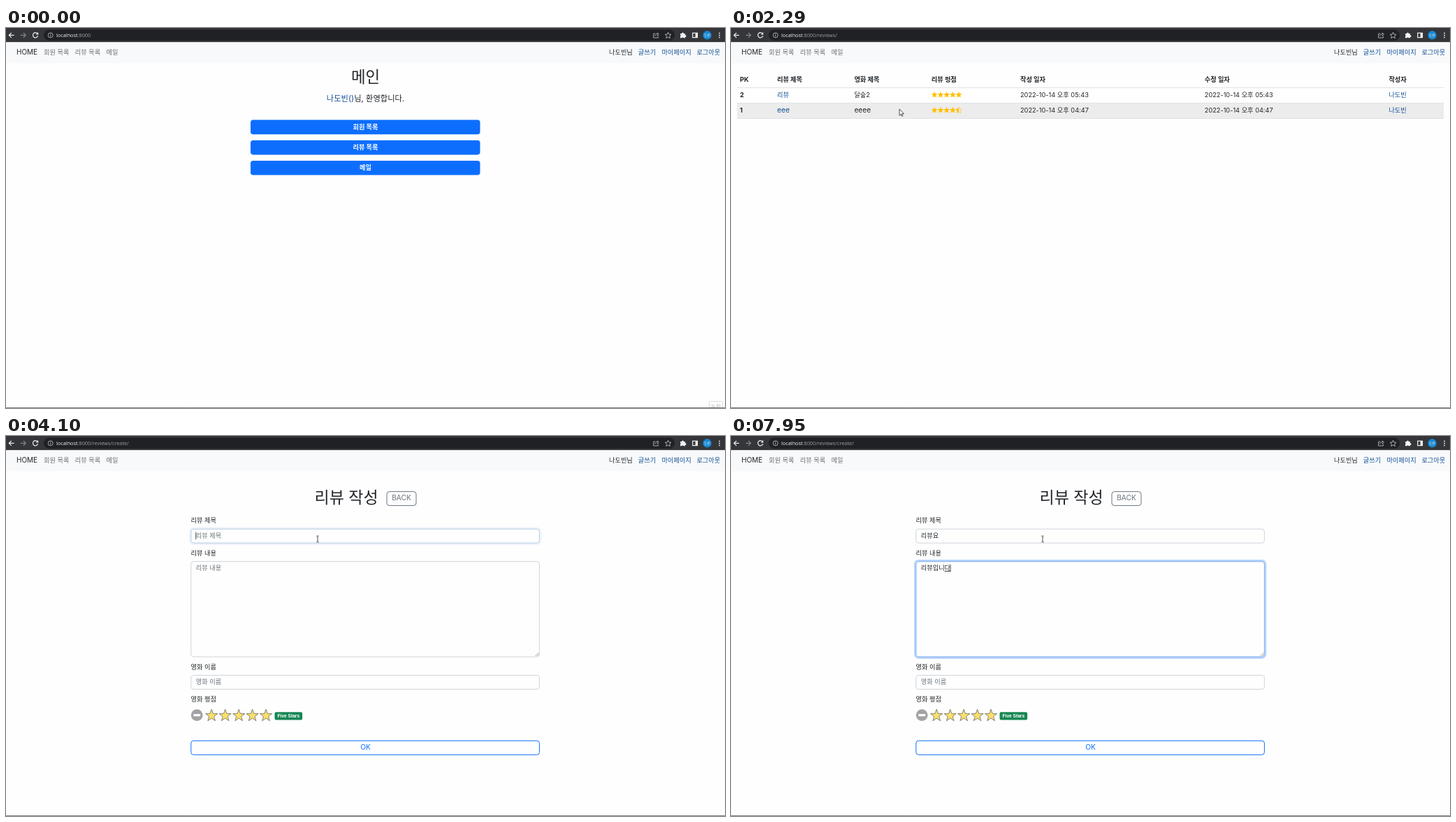
Write an HTML page that moves like this. It is 1029 px wide and 544 px high and loops after 8 s.

```html
<!DOCTYPE html>
<html lang="ko">
<head>
<meta charset="utf-8">
<title>리뷰 작성</title>
<style>
html, body { margin: 0; width: 100%; height: 100%; overflow: hidden; background: #fefefe; }
svg { display: block; width: 100vw; height: 100vh; }
text { font: 400 9.2px Inter, "Noto Sans CJK KR", sans-serif; fill: #212529; white-space: pre; }
.mid { text-anchor: middle; }
.bold, .head text { font-weight: 700; }
.link { fill: #124f97; }
.nav { fill: #6f7072; }
.muted { fill: #6c757d; }
.latin { font-size: 10.2px; }
.white { fill: #fff; }
.url { font: 7.3px "Open Sans", sans-serif; fill: #f1f3f4; }
.url tspan { fill: #9aa0a6; }
.field { fill: #fefefe; stroke: #ced4da; }
.rule { stroke: #dee2e6; }
.status { font: 6.3px "Open Sans", sans-serif; fill: #e8eaed; }
.status-box { fill: #3c4043; }
.ring { fill: none; stroke: #0d6efd; stroke-opacity: .28; stroke-width: 2.4; }
.edge { fill: none; stroke: #86b7fe; }
.composing { text-decoration: underline; }

.step { animation: 8s step-end infinite; }
.ease { animation: 8s linear infinite; }
#tip { animation-name: tip; }
#home { animation-name: home; }
#list { animation-name: list; }
#form { animation-name: form; }
#reload { animation-name: reload; }
#stop { animation-name: stop; }
#membersHover { animation-name: members-hover; }
#reviewsHover { animation-name: reviews-hover; }
#row1 { animation-name: row1; }
#row2 { animation-name: row2; }
#navMembers { animation-name: nav-members; }
#navWrite { animation-name: nav-write; }
#toMembers { animation-name: to-members; }
#toReviews { animation-name: to-reviews; }
#toCreate { animation-name: to-create; }
#titleFocus { animation-name: title-focus; }
#bodyFocus { animation-name: body-focus; }
#pointer { animation-name: travel; }
#arrow { animation-name: arrow; }
#hand { animation-name: hand; }
#beam { animation-name: beam; }

@keyframes tip { 0% { opacity: 1 } .375%, 100% { opacity: 0 } }
@keyframes home { 0% { opacity: 1 } 23.1%, 100% { opacity: 0 } }
@keyframes list { 0%, 46%, 100% { opacity: 0 } 23.1% { opacity: 1 } }
@keyframes form { 0% { opacity: 0 } 46%, 100% { opacity: 1 } }
@keyframes reload { 0%, 23.1%, 46%, 100% { opacity: 1 } 22%, 42.75% { opacity: 0 } }
@keyframes stop { 0%, 23.1%, 46%, 100% { opacity: 0 } 22%, 42.75% { opacity: 1 } }
@keyframes members-hover { 0%, 16.96%, 100% { opacity: 0 } 15.4% { opacity: 1 } }
@keyframes reviews-hover { 0%, 100% { opacity: 0 } 17.6% { opacity: 1 } }
@keyframes row2 { 0%, 32.8%, 100% { opacity: 0 } 27.85% { opacity: 1 } }
@keyframes row1 { 0%, 35.7%, 100% { opacity: 0 } 32.8% { opacity: 1 } }
@keyframes nav-members { 0%, 10.9%, 100% { fill: #6f7072 } 8.5% { fill: #4a4b4d } }
@keyframes nav-write { 0%, 43.9%, 100% { fill: #124f97 } 42.4% { fill: #0a3a75 } }
@keyframes to-members { 0%, 8.4%, 17.6%, 100% { opacity: 0 } 8.6%, 17.5% { opacity: 1 } }
@keyframes to-reviews { 0%, 17.5%, 25.6%, 100% { opacity: 0 } 17.6%, 24% { opacity: 1 } }
@keyframes to-create { 0%, 42.2%, 44.9%, 100% { opacity: 0 } 42.4%, 43.5% { opacity: 1 } }
@keyframes title-focus { 0%, 50.9%, 79%, 100% { opacity: 0 } 52.4%, 77.1% { opacity: 1 } }
@keyframes body-focus { 0%, 77.1% { opacity: 0 } 79%, 100% { opacity: 1 } }
@keyframes travel {
  0%, .375% { transform: translate(1012px, 546px) }
  5% { transform: translate(430px, 300px) }
  8.75%, 10.6% { transform: translate(76px, 38px) }
  14.5% { transform: translate(379px, 119px) }
  18.4%, 22% { transform: translate(425px, 171px) }
  25.6% { transform: translate(282px, 166px) }
  28.63% { transform: translate(241px, 116px) }
  32.25% { transform: translate(262px, 112px) }
  42.4%, 43.1% { transform: translate(908px, 34px) }
  44.25% { transform: translate(898px, 37px) }
  50.9%, 100% { transform: translate(446px, 147.5px) }
}
@keyframes arrow {
  0%, 10.9%, 16.96%, 23.1%, 43.9% { opacity: 1 }
  8.5%, 15.4%, 17.6%, 42.4%, 50.3%, 100% { opacity: 0 }
}
@keyframes hand {
  0%, 10.9%, 16.96%, 23.1%, 43.9%, 100% { opacity: 0 }
  8.5%, 15.4%, 17.6%, 42.4% { opacity: 1 }
}
@keyframes beam { 0% { opacity: 0 } 50.3%, 100% { opacity: 1 } }
</style>
</head>
<body>
<svg viewBox="0 0 1029 544" preserveAspectRatio="none">
  <defs>
    <path id="star" d="M0-4.5 1.3-1.6 4.4-1.3 2.1.8 2.8 4 0 2.3-2.8 4-2.1.8-4.4-1.3-1.3-1.6Z"/>
    <path id="halfStar" d="M0-4.5V2.3L-2.8 4-2.1.8-4.4-1.3-1.3-1.6Z"/>
    <g id="fourStars">
      <use href="#star"/><use href="#star" x="8.7"/><use href="#star" x="17.4"/><use href="#star" x="26.1"/>
    </g>
    <path id="bigStar" d="M0-8.8 2.2-2.6 8.6-2.5 3.5 1.4 5.3 7.7 0 4-5.3 7.7-3.5 1.4-8.6-2.5-2.2-2.6Z" fill="#fbe069" stroke="#777" stroke-width=".9" stroke-linejoin="round"/>
  </defs>

  <rect width="1029" height="544" fill="#fefefe"/>

  <!-- browser bar -->
  <rect width="1029" height="20.4" fill="#35363a"/>
  <rect x="54" y="2.5" width="903" height="15.6" rx="7.8" fill="#202124"/>
  <g fill="none" stroke="#f1f3f4" stroke-width="1.2">
    <path d="M11.5 10.3H4.5M7.8 6.8 4.3 10.3 7.8 13.8"/>
    <path d="M21 10.3h7M24.8 6.8 28.3 10.3 24.8 13.8" stroke="#85878b"/>
    <path id="reload" class="step" d="M45 8.1A3.6 3.6 0 1 0 45.6 11.2M45.6 6.4V9H43"/>
    <path id="stop" class="step" d="M39 7.3 45 13.3M45 7.3 39 13.3"/>
    <g stroke="#b7babe" stroke-width=".9">
      <circle cx="63.7" cy="10.3" r="3.5"/><path d="M63.7 9.7v2.6M63.7 8v1"/>
      <path d="M929 8h-2.3v6h6.6v-2M928.7 11.5c.3-2 1.5-3 3.6-3V6.8l2 2.4-2 2.2V9.8"/>
      <use href="#star" x="947.6" y="10.6" fill="none"/>
    </g>
    <rect x="982.7" y="7.2" width="6.8" height="6.4"/>
  </g>
  <g fill="#f1f3f4">
    <path d="M965 8h2a1.5 1.5 0 0 1 3 0h2v2a1.5 1.5 0 0 1 0 3v1.2h-2.3a1.3 1.3 0 0 0-2.4 0H965v-2.5a1.3 1.3 0 0 0 0-2.2Z"/>
    <path d="M986.6 7h3v7h-3Z"/>
    <circle cx="1021" cy="7.4" r=".9"/><circle cx="1021" cy="10.4" r=".9"/><circle cx="1021" cy="13.4" r=".9"/>
  </g>
  <circle cx="1003.5" cy="10.3" r="6.2" fill="#1687d0"/>
  <text class="mid white" x="1003.5" y="12" style="font-size:4.6px">도빈</text>

  <!-- site navigation -->
  <rect y="20.4" width="1029" height="29.8" fill="#f8f9fa"/>
  <text x="15" y="38" style="font-size:10px">HOME</text>
  <text id="navMembers" class="nav step" x="54" y="38">회원 목록</text>
  <text class="nav" x="98.8" y="38">리뷰 목록</text>
  <text class="nav" x="143.6" y="38">메일</text>
  <text x="863" y="38">나도빈님</text>
  <text id="navWrite" class="link step" x="904.8" y="38">글쓰기</text>
  <text class="link" x="938.4" y="38">마이페이지</text>
  <text class="link" x="988.4" y="38">로그아웃</text>

  <g id="home" class="step">
    <text class="url" x="72" y="12.9">localhost<tspan>:8000</tspan></text>
    <text class="mid" x="514.5" y="78.3" style="font-size:22.4px">메인</text>
    <text class="mid" x="514.5" y="105" style="font-size:11.3px"><tspan class="link">나도빈()</tspan>님, 환영합니다.</text>
    <g fill="#0d6efd">
      <rect x="350" y="131.6" width="328.5" height="20.6" rx="3.8"/>
      <rect x="350" y="160.8" width="328.5" height="20.6" rx="3.8"/>
      <rect x="350" y="190" width="328.5" height="20.6" rx="3.8"/>
    </g>
    <g fill="#0b5ed7">
      <rect id="membersHover" class="step" x="350" y="131.6" width="328.5" height="20.6" rx="3.8"/>
      <rect id="reviewsHover" class="step" x="350" y="160.8" width="328.5" height="20.6" rx="3.8"/>
    </g>
    <text class="mid bold white" x="514.5" y="144.5">회원 목록</text>
    <text class="mid bold white" x="514.5" y="173.6">리뷰 목록</text>
    <text class="mid bold white" x="514.5" y="202.7">메일</text>
  </g>

  <g id="list" class="step">
    <text class="url" x="72" y="12.9">localhost<tspan>:8000/reviews/</tspan></text>
    <g fill="#ececec">
      <rect id="row1" class="step" x="8.6" y="85.5" width="1011.4" height="22"/>
      <rect id="row2" class="step" x="8.6" y="107.5" width="1011.4" height="22"/>
    </g>
    <path class="rule" d="M8.6 85.5H1020M8.6 107.5H1020M8.6 129.5H1020"/>
    <g class="head">
      <text x="12.8" y="76.5">PK</text><text x="66" y="76.5">리뷰 제목</text><text x="176.4" y="76.5">영화 제목</text>
      <text x="286.8" y="76.5">리뷰 평점</text><text x="414" y="76.5">작성 일자</text><text x="677.8" y="76.5">수정 일자</text>
      <text x="941.4" y="76.5">작성자</text>
    </g>
    <text class="bold" x="12.8" y="99">2</text>
    <text class="link" x="66" y="99">리뷰</text>
    <text x="176.4" y="99">달숲2</text>
    <text x="414" y="99">2022-10-14 오후 05:43</text>
    <text x="677.8" y="99">2022-10-14 오후 05:43</text>
    <text class="link" x="941.4" y="99">나도빈</text>
    <text class="bold" x="12.8" y="121">1</text>
    <text class="link latin" x="66" y="121">eee</text>
    <text class="latin" x="176.4" y="121">eeee</text>
    <text x="414" y="121">2022-10-14 오후 04:47</text>
    <text x="677.8" y="121">2022-10-14 오후 04:47</text>
    <text class="link" x="941.4" y="121">나도빈</text>
    <g fill="#ffc107">
      <use href="#fourStars" x="291.2" y="95.6"/><use href="#star" x="326" y="95.6"/>
      <use href="#fourStars" x="291.2" y="117.6"/><use href="#halfStar" x="326" y="117.6"/>
      <use href="#star" x="326" y="117.6" fill="none" stroke="#ffc107" stroke-width=".6"/>
    </g>
  </g>

  <g id="form" class="step">
    <text class="url" x="72" y="12.9">localhost<tspan>:8000/reviews/create/</tspan></text>
    <text x="441.5" y="96" style="font-size:23px">리뷰 작성</text>
    <rect x="545" y="79.6" width="42" height="20" rx="3.6" fill="none" stroke="#6c757d"/>
    <text class="mid muted latin" x="566" y="92.4">BACK</text>

    <text x="264.6" y="124.4">리뷰 제목</text>
    <rect class="field" x="264.8" y="133.2" width="498.6" height="20" rx="3.6"/>
    <g id="titleFocus" class="ease">
      <rect class="edge" x="264.8" y="133.2" width="498.6" height="20" rx="3.6"/>
      <rect class="ring" x="263.2" y="131.6" width="501.8" height="23.2" rx="5"/>
    </g>
    <g id="titleInput"></g>

    <text x="264.6" y="170.8">리뷰 내용</text>
    <rect class="field" x="264.8" y="179.7" width="498.6" height="136.4" rx="3.6"/>
    <g id="bodyFocus" class="ease">
      <rect class="edge" x="264.8" y="179.7" width="498.6" height="136.4" rx="3.6"/>
      <rect class="ring" x="263.2" y="178.1" width="501.8" height="139.6" rx="5"/>
    </g>
    <path d="M757.5 315 762.5 310M760.3 315 762.5 312.8" stroke="#777" stroke-width=".7"/>
    <g id="bodyInput"></g>

    <text x="264.6" y="333.8">영화 이름</text>
    <rect class="field" x="264.8" y="342.5" width="498.6" height="20" rx="3.6"/>
    <text class="muted" x="271.8" y="355">영화 이름</text>

    <text x="264.6" y="380.3">영화 평점</text>
    <circle cx="273.2" cy="399.6" r="8.4" fill="#a3a3a3"/>
    <rect x="268.2" y="397.9" width="10" height="3.4" rx=".8" fill="#fff"/>
    <use href="#bigStar" x="294.2" y="400"/><use href="#bigStar" x="313.7" y="400"/><use href="#bigStar" x="333.2" y="400"/>
    <use href="#bigStar" x="352.6" y="400"/><use href="#bigStar" x="372" y="400"/>
    <rect x="384.5" y="395.2" width="39.6" height="11.4" rx="2" fill="#198754"/>
    <text class="mid white" x="404.3" y="403.2" style="font:700 6.6px 'Liberation Sans', sans-serif">Five Stars</text>

    <rect x="264.8" y="436.3" width="498.6" height="20" rx="3.6" fill="none" stroke="#0d6efd"/>
    <text class="mid latin" x="514.5" y="449.2" style="fill:#0d6efd">OK</text>
  </g>

  <!-- status bubbles and bottom edge -->
  <g id="tip" class="step">
    <rect x="1006.5" y="534.5" width="19" height="12" rx="1" fill="#fdfdfd" stroke="#dcdcdc"/>
    <text class="mid" x="1016" y="545" style="font-size:7.5px;fill:#bbb">녹화</text>
  </g>
  <path d="M0 543.6H1029" stroke="#66686a" stroke-width=".9"/>
  <g id="toMembers" class="ease">
    <path class="status-box" d="M0 532H73q2 0 2 2V544H0Z"/>
    <text class="status" x="0" y="540.2">ocalhost:8000/accounts/</text>
  </g>
  <g id="toReviews" class="ease">
    <path class="status-box" d="M0 532H69q2 0 2 2V544H0Z"/>
    <text class="status" x="0" y="540.2">ocalhost:8000/reviews/</text>
  </g>
  <g id="toCreate" class="ease">
    <path class="status-box" d="M0 532H89q2 0 2 2V544H0Z"/>
    <text class="status" x="0" y="540.2">ocalhost:8000/reviews/create/</text>
  </g>

  <g id="pointer" class="ease">
    <path id="arrow" class="step" d="M0 0V9.3L2.1 7.3 3.6 10.4 4.9 9.8 3.5 6.8H6.4Z" fill="#fff" stroke="#222" stroke-width=".8"/>
    <path id="hand" class="step" d="M-1 .5q1-1.2 2 0V4l4 1q1 .3 .9 1.4L5.4 10.5H.6L-2.6 6.6q.2-1.2 1.6-.2Z" fill="#fff" stroke="#222" stroke-width=".8"/>
    <path id="beam" class="step" d="M-1.8-4.2H-.5L0-3.8.5-4.2H1.8M0-3.8V3.8M-1.8 4.2H-.5L0 3.8.5 4.2H1.8" fill="none" stroke="#222" stroke-width=".8"/>
  </g>
</svg>
<script>
const LOOP = 8000;
const LEFT = 271.8;
const SVG_NS = "http://www.w3.org/2000/svg";

// A trailing "|" is the caret; Hangul before it is still being composed.
const titleSteps = [
  [0, ""], [4070, "|"], [4570, ""], [4870, "f|"], [5210, "|"], [5410, ""],
  [5570, "ㄹ|"], [5650, "리|"], [5850, "립|"], [5900, "리뷰|"], [5990, "리븅|"],
  [6080, "리뷰요|"], [6170, "리뷰요"]
];
const bodySteps = [
  [0, ""], [6170, "|"], [6480, "ㄹ|"], [6580, "리|"], [6760, "립|"], [6850, "리뷰|"],
  [6950, "리븅|"], [7060, "리뷰이|"], [7250, "리뷰입|"], [7340, "리뷰입ㄴ|"],
  [7430, "리뷰입니|"], [7560, "리뷰입닏|"], [7700, "리뷰입니다|"]
];

function add(parent, tag, attributes = {}) {
  const node = document.createElementNS(SVG_NS, tag);
  for (const [name, value] of Object.entries(attributes)) node.setAttribute(name, value);
  return parent.appendChild(node);
}

function createInput(id, baseline, hint, steps) {
  const group = document.getElementById(id);
  const placeholder = add(group, "text", { class: "muted", x: LEFT, y: baseline });
  placeholder.textContent = hint;
  const value = add(group, "text", { x: LEFT, y: baseline });
  const settled = add(value, "tspan");
  const composing = add(value, "tspan", { class: "composing" });
  const caret = add(group, "rect", { y: baseline - 8, width: .8, height: 10.4, fill: "#222" });
  let shown = null;

  return time => {
    const state = steps.findLast(([start]) => start <= time)[1];
    if (state === shown) return;
    shown = state;
    const hasCaret = state.endsWith("|");
    const text = state.replace("|", "");
    const split = hasCaret && /[ㄱ-힣]$/.test(text) ? text.length - 1 : text.length;
    settled.textContent = text.slice(0, split);
    composing.textContent = text.slice(split);
    placeholder.style.opacity = text ? 0 : 1;
    caret.style.opacity = hasCaret ? 1 : 0;
    caret.setAttribute("x", LEFT - .4 + (text ? value.getComputedTextLength() : 0));
  };
}

const inputs = [
  createInput("titleInput", 145.6, "리뷰 제목", titleSteps),
  createInput("bodyInput", 192, "리뷰 내용", bodySteps)
];

let start;
function render(now) {
  start ??= now;
  const time = (now - start) % LOOP;
  for (const update of inputs) update(time);
  requestAnimationFrame(render);
}
requestAnimationFrame(render);
</script>
</body>
</html>
```
